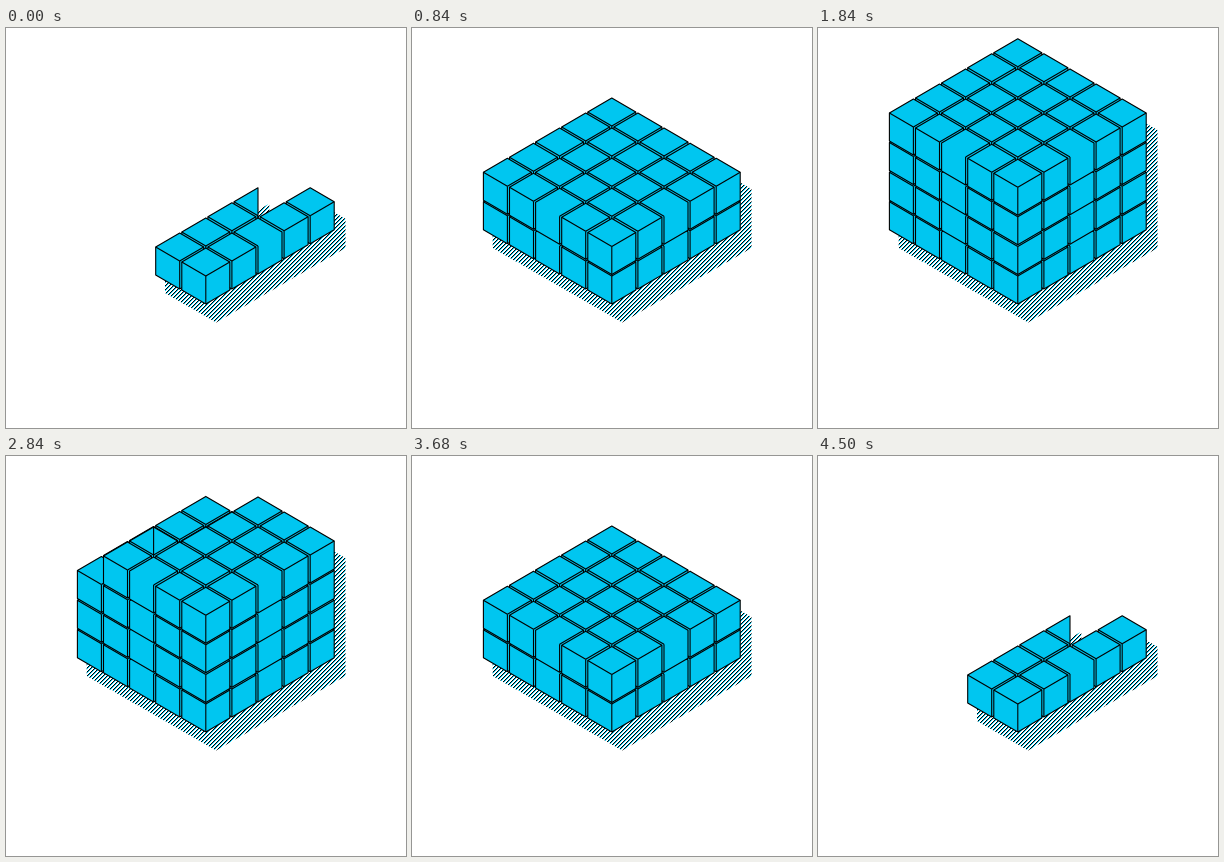
Write an HTML page with a canvas that moves like this. It is 400 px wide and 400 px high and loops after 4640 ms.

```html
<!DOCTYPE html>
<html lang="en">
<head>
<meta charset="utf-8">
<title>Stacking cubes</title>
<style>
html, body { margin: 0; width: 100%; height: 100%; overflow: hidden; background: #fff; }
canvas { display: block; width: 400px; height: 400px; }
</style>
</head>
<body>
<canvas id="stage" width="400" height="400"></canvas>
<script>
const ctx = document.getElementById('stage').getContext('2d');
const CYAN = '#00c6f0';
const LOOP = 4640;
const SIZE = 5;
const STEP_X = 26.1, STEP_Y = 15.05, STEP_Z = 29.6;
const HALF_W = 24, HALF_H = 14, SIDE = 28;

// Each step adds a third of a layer; the stack then shrinks the same way.
const RISE = [0, 180, 340, 500, 680, 840, 1000, 1180, 1340, 1500, 1680, 1840];
const FALL = [2840, 3000, 3180, 3340, 3500, 3680, 3840, 4000, 4180, 4340, 4500];

function thirdsAt(t) {
  const passed = list => list.filter(start => t >= start).length;
  return passed(RISE) - passed(FALL);
}

function makeHatch() {
  const tile = document.createElement('canvas');
  tile.width = tile.height = 4;
  const c = tile.getContext('2d');
  const inks = ['#000', CYAN, '#fff', '#fff'];
  for (let y = 0; y < 4; y++) {
    for (let x = 0; x < 4; x++) {
      c.fillStyle = inks[(x + y) % 4];
      c.fillRect(x, y, 1, 1);
    }
  }
  return ctx.createPattern(tile, 'repeat');
}
const hatch = makeHatch();

// Cubes from back to front; parts = thirds of the cube that are present.
function listCubes(thirds) {
  const cubes = [];
  for (let k = 0; k * 3 < thirds; k++) {
    const filled = SIZE * SIZE * Math.min(3, thirds - k * 3);
    for (let j = SIZE - 1; j >= 0; j--) {
      for (let i = SIZE - 1; i >= 0; i--) {
        const parts = Math.min(3, filled - 3 * (j * SIZE + i));
        if (parts > 0) cubes.push({ i, j, k, parts });
      }
    }
  }
  return cubes;
}

function corners({ i, j, k }) {
  const x = 199.8 + (i - j) * STEP_X;
  const y = 234 - (i + j) * STEP_Y - k * STEP_Z;
  return {
    left: [x - HALF_W, y],
    back: [x, y - HALF_H],
    right: [x + HALF_W, y],
    front: [x, y + HALF_H],
    lowLeft: [x - HALF_W, y + SIDE],
    lowRight: [x + HALF_W, y + SIDE],
    low: [x, y + HALF_H + SIDE]
  };
}

function outline(p, parts) {
  return parts === 1
    ? [p.left, p.back, p.low, p.lowLeft]
    : [p.left, p.back, p.right, p.lowRight, p.low, p.lowLeft];
}

function trace(points) {
  ctx.beginPath();
  points.forEach(([x, y]) => ctx.lineTo(x, y));
  ctx.closePath();
}

function line(a, b) {
  ctx.beginPath();
  ctx.moveTo(...a);
  ctx.lineTo(...b);
  ctx.stroke();
}

function drawShadow(cubes) {
  ctx.fillStyle = ctx.strokeStyle = hatch;
  ctx.lineWidth = 2;
  for (const cube of cubes) {
    const shape = outline(corners(cube), cube.parts);
    trace(shape.map(([x, y]) => [x + 10.3, y + 17.5]));
    ctx.fill();
    ctx.stroke();
  }
}

function drawCube(cube) {
  const { i, j, parts } = cube;
  const p = corners(cube);
  trace(outline(p, parts));
  ctx.fill();
  ctx.stroke();
  if (!(i === 0 && j === 2)) line(p.left, p.front);
  if (parts > 1 && !(i === 2 && j === 0)) line(p.front, p.right);
  line(p.front, p.low);
  if (parts === 2) line(p.back, p.front);
}

function render(t) {
  const cubes = listCubes(thirdsAt(t));
  ctx.fillStyle = '#fff';
  ctx.fillRect(0, 0, 400, 400);
  ctx.lineJoin = 'round';
  drawShadow(cubes);
  ctx.fillStyle = CYAN;
  ctx.strokeStyle = '#000';
  ctx.lineWidth = 1.1;
  cubes.forEach(drawCube);
}

function tick() {
  render(performance.now() % LOOP);
  requestAnimationFrame(tick);
}
tick();
</script>
</body>
</html>
```
